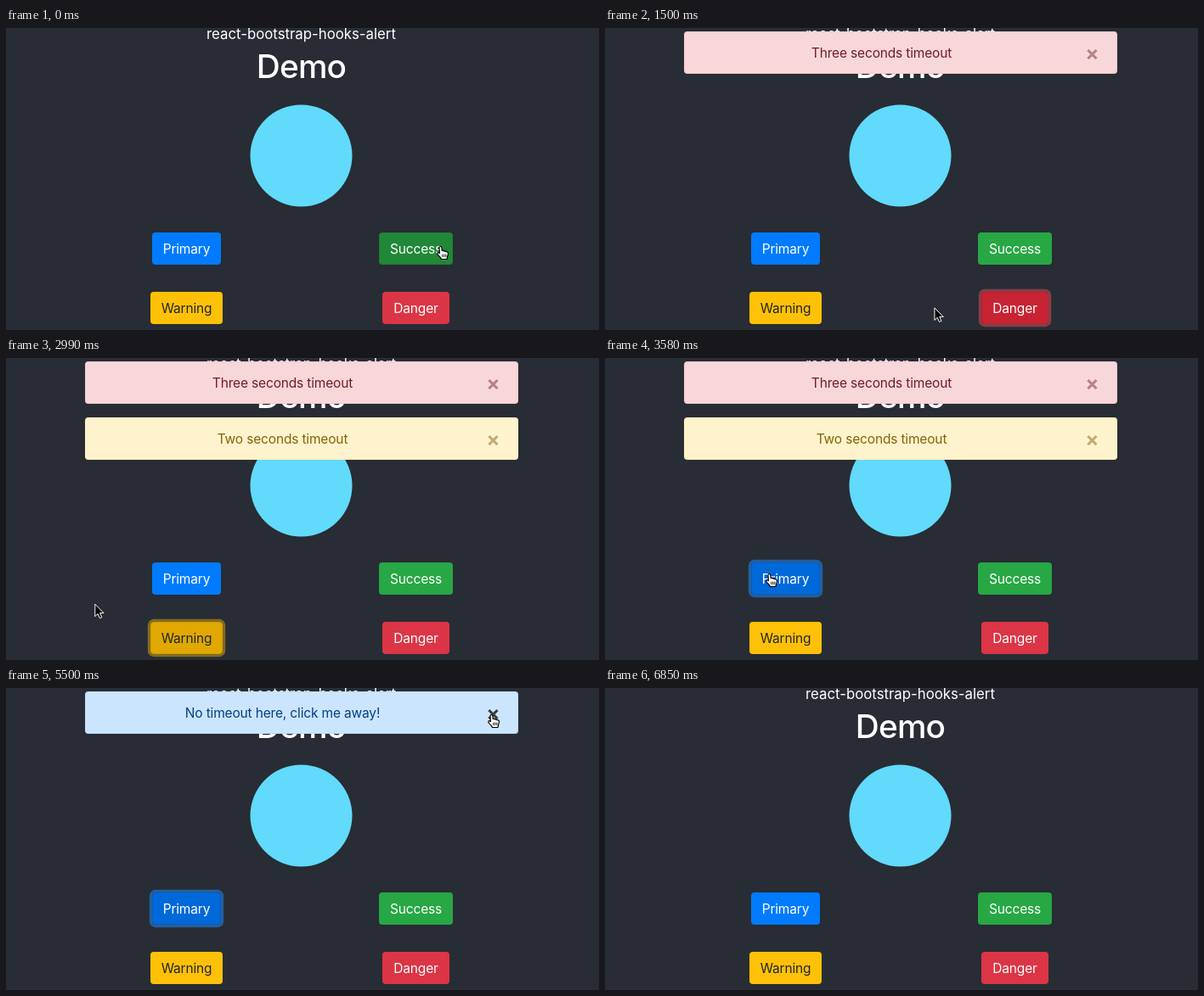
Write an HTML page with a canvas that moves like this. It is 698 px wide and 356 px high and loops after 6.95 s.

```html
<!DOCTYPE html>
<html lang="en">
<head>
<meta charset="utf-8">
<title>Alert demo</title>
<style>
  html, body { margin: 0; width: 100%; height: 100%; overflow: hidden; background: #282c34; }
  canvas { display: block; }
</style>
</head>
<body>
<canvas id="stage" width="698" height="356"></canvas>
<script>
const ctx = document.getElementById('stage').getContext('2d');
const LOOP = 6950;
const FONT = 'Inter, "Liberation Sans", sans-serif';

const TICKS = [[0, 0], [15, 2250], [22, 3280], [23, 3430], [30, 4470], [31, 4620],
  [38, 5650], [39, 5800], [45, 6690], [46, 6850]];
const SLACK = 0.06; // capture jitter, as a share of one tick

const BUTTONS = [
  { id: 'primary', label: 'Primary', x: 172, y: 241, w: 81, fill: '#007bff', dark: '#0069d9', edge: '#0062cc', ring: '38,143,255' },
  { id: 'success', label: 'Success', x: 439, y: 241, w: 87, fill: '#28a745', dark: '#218838', edge: '#1e7e34', ring: '72,180,97' },
  { id: 'warning', label: 'Warning', x: 170, y: 311, w: 85, fill: '#ffc107', dark: '#e0a800', edge: '#d39e00', ring: '222,170,12', ink: '#212529' },
  { id: 'danger', label: 'Danger', x: 443, y: 311, w: 79, fill: '#dc3545', dark: '#c82333', edge: '#bd2130', ring: '225,83,97' }
];
const BUTTON_H = 38;

// In stacking order, top first
const ALERTS = [
  { text: 'One second timeout', from: 300, to: 1200, fill: '#d4edda', edge: '#c3e6cb', ink: '#155724' },
  { text: 'Three seconds timeout', from: 1200, to: 4150, fill: '#f8d7da', edge: '#f5c6cb', ink: '#721c24' },
  { text: 'Two seconds timeout', from: 2250, to: 4150, fill: '#fff3cd', edge: '#ffeeba', ink: '#856404' },
  { text: 'No timeout here, click me away!', from: 3720, to: 5790, fadeAt: 5640, fill: '#cce5ff', edge: '#b8daff', ink: '#004085' }
];

// Focus changes: [ms, button id]
const FOCUS = [[0, ''], [150, 'success'], [1050, 'danger'], [2100, 'warning'], [3570, 'primary'], [5640, '']];

// Pointer tip: [ms, x, y]
const POINTER = [[0, 511.5, 258], [300, 511.5, 258], [890, 491.5, 331], [1190, 491.5, 331],
  [1950, 206.5, 328], [2380, 206.5, 328], [2850, 90, 296], [3420, 193.5, 255], [3720, 193.5, 255],
  [4170, 695, 245], [4310, 715, 252], [4460, 715, 262], [4610, 629, 263], [5100, 590, 62],
  [5480, 571.5, 32], [5800, 571.5, 32], [6250, 576, 2], [6400, 578, -25], [LOOP, 578, -25]];

function snap(t) {
  let i = 0;
  while (i < TICKS.length - 2 && TICKS[i + 1][1] <= t) i++;
  const [a, ta] = TICKS[i], [b, tb] = TICKS[i + 1];
  if (t >= tb) return tb;
  const step = (tb - ta) / (b - a);
  return ta + Math.floor((t - ta) / step + SLACK) * step;
}

function pointerAt(t) {
  const i = Math.max(1, POINTER.findIndex(k => k[0] >= t));
  const [ta, xa, ya] = POINTER[i - 1], [tb, xb, yb] = POINTER[i];
  const p = (t - ta) / (tb - ta);
  const e = p * p * (3 - 2 * p);
  return { x: xa + (xb - xa) * e, y: ya + (yb - ya) * e };
}

const inside = (p, x, y, w, h) => p.x >= x && p.x <= x + w && p.y >= y && p.y <= y + h;

function box(x, y, w, h, r, fill) {
  ctx.beginPath();
  ctx.roundRect(x, y, w, h, r);
  ctx.fillStyle = fill;
  ctx.fill();
}

function bordered(x, y, w, h, fill, edge) {
  box(x, y, w, h, 4, edge);
  box(x + 1, y + 1, w - 2, h - 2, 3, fill);
}

function label(text, x, y, size, color, weight = 400, spacing = -0.16) {
  ctx.font = `${weight} ${size}px ${FONT}`;
  ctx.letterSpacing = spacing + 'px';
  ctx.textAlign = 'center';
  ctx.fillStyle = color;
  ctx.fillText(text, x, y);
}

function drawButton(b, focused, hovered) {
  const on = focused || hovered;
  if (focused) {
    ctx.beginPath();
    ctx.roundRect(b.x - 3.2, b.y - 3.2, b.w + 6.4, BUTTON_H + 6.4, 7.2);
    ctx.roundRect(b.x, b.y, b.w, BUTTON_H, 4);
    ctx.fillStyle = `rgba(${b.ring},.5)`;
    ctx.fill('evenodd');
  }
  bordered(b.x, b.y, b.w, BUTTON_H, on ? b.dark : b.fill, on ? b.edge : b.fill);
  label(b.label, b.x + b.w / 2, b.y + 25, 15.5, b.ink || '#fff');
}

function drawCross(x, y, color, alpha) {
  ctx.save();
  ctx.globalAlpha *= alpha;
  ctx.font = `700 24px ${FONT}`;
  const m = ctx.measureText('×');
  const base = y + (m.actualBoundingBoxAscent - m.actualBoundingBoxDescent) / 2;
  label('×', x, base + 1, 24, '#fff', 700, 0);
  label('×', x, base, 24, color, 700, 0);
  ctx.restore();
}

const overClose = (p, y) => inside(p, 544, y, 58, 50);

function drawAlert(a, y, t, pointer) {
  ctx.save();
  if (t >= a.fadeAt) ctx.globalAlpha = 0.5;
  bordered(93, y, 510, 50, a.fill, a.edge);
  label(a.text, 325.5, y + 31, 15.5, a.ink);
  if (overClose(pointer, y)) drawCross(573.5, y + 27, '#000', 0.75);
  else drawCross(573.5, y + 27, a.ink, 0.5);
  ctx.restore();
}

const HAND = new Path2D('M3.4 8.6L3 2Q3 .5 4.4 .5Q5.6 .5 5.8 2L6.3 5.6Q7 4.8 8.2 5.4Q8.6 5.6 8.8 6.2' +
  'Q10 5.4 11 6.8Q12.6 6.2 13.3 7.8Q13.6 10 12.6 12.2L12 15.5H5.5Q4.6 13 1.6 10.6Q.2 9 1 8Q2 7.2 3.4 8.6Z');
const KNUCKLES = new Path2D('M6.8 9.6V13M8.8 9.6V13M10.8 9.6V13');
const ARROW = new Path2D('M0 0V14.5L3.3 11.4L5.6 16.6L8 15.5L5.8 10.5H10.3Z');

function paint(path, fill, stroke, width) {
  ctx.fillStyle = fill;
  ctx.strokeStyle = stroke;
  ctx.lineWidth = width;
  ctx.fill(path);
  ctx.stroke(path);
}

function drawPointer(p, hand) {
  ctx.save();
  ctx.lineJoin = 'round';
  if (hand) {
    ctx.translate(p.x - 4.5, p.y - 1);
    paint(HAND, '#fff', '#000', 1.2);
    ctx.lineWidth = 0.9;
    ctx.stroke(KNUCKLES);
  } else {
    ctx.translate(p.x, p.y);
    paint(ARROW, '#000', '#fff', 1);
  }
  ctx.restore();
}

function draw(t) {
  const pointer = pointerAt(t);
  const focus = FOCUS.filter(f => f[0] <= t + 1).pop()[1];
  const alerts = ALERTS.filter(a => t + 1 >= a.from && t + 1 < a.to);
  let hand = false;

  ctx.fillStyle = '#282c34';
  ctx.fillRect(0, 0, 698, 356);
  label('react-bootstrap-hooks-alert', 347.5, 13, 16.8, '#fff', 400, 0);
  label('Demo', 347.5, 59, 38.8, '#fff', 500, -0.8);

  ctx.beginPath();
  ctx.arc(347.5, 150.5, 60, 0, Math.PI * 2);
  ctx.fillStyle = '#61dafb';
  ctx.fill();

  for (const b of BUTTONS) {
    const over = inside(pointer, b.x, b.y, b.w, BUTTON_H);
    hand = hand || over;
    drawButton(b, b.id === focus, over);
  }
  alerts.forEach((a, i) => {
    const y = 4 + i * 66;
    drawAlert(a, y, t, pointer);
    hand = hand || overClose(pointer, y);
  });
  drawPointer(pointer, hand);
}

function tick() {
  draw(snap(performance.now() % LOOP));
  requestAnimationFrame(tick);
}
tick();
</script>
</body>
</html>
```
